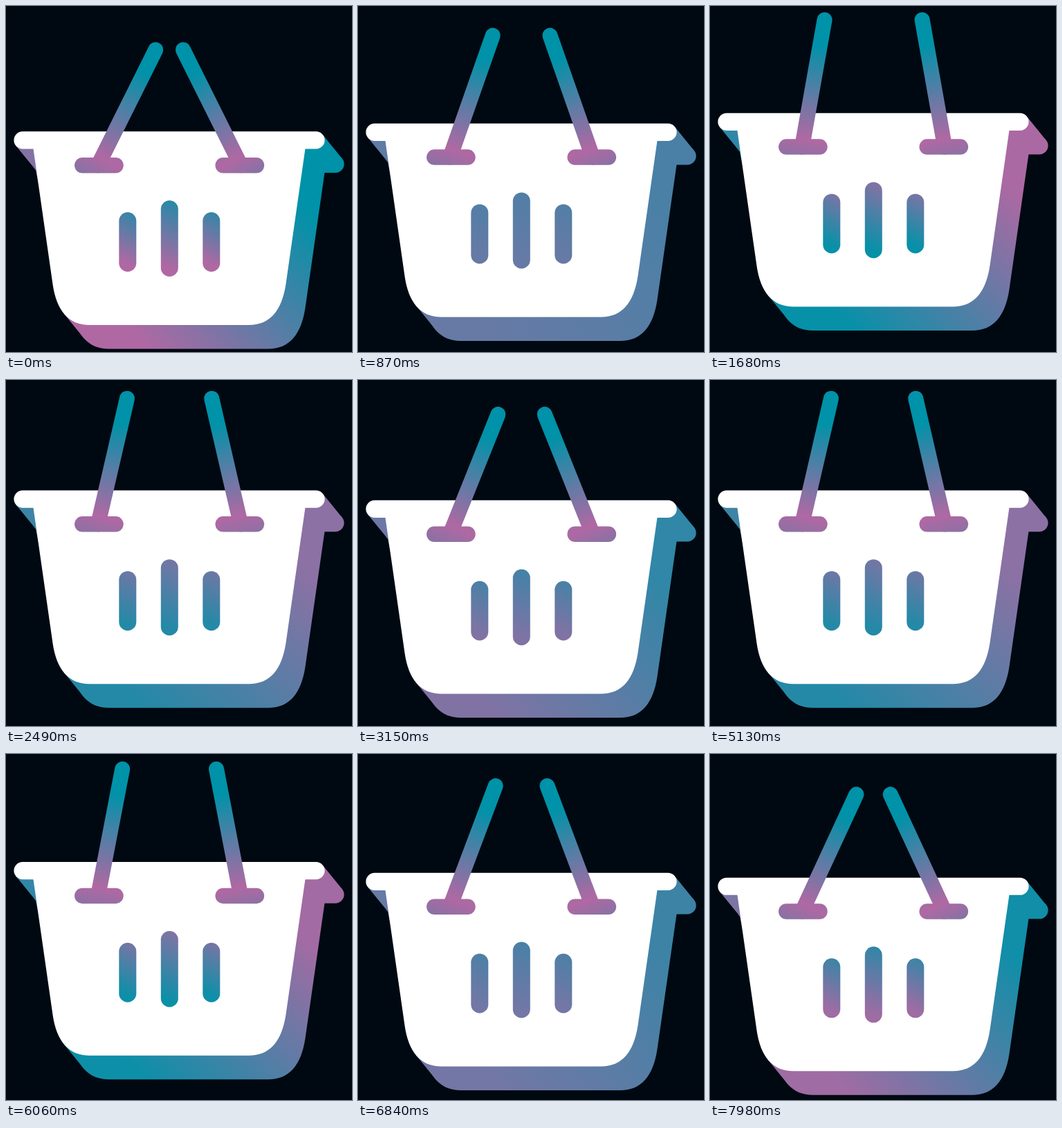
An HTML page with a canvas for the animation above (8010 ms loop, 500 by 500 pixels).

```html
<!DOCTYPE html>
<html lang="en">
<head>
<meta charset="utf-8">
<title>Shopping basket</title>
<style>
  html, body { margin: 0; height: 100%; overflow: hidden; background: #000911; }
  canvas { display: block; }
</style>
</head>
<body>
<canvas id="stage" width="500" height="500"></canvas>
<script>
const ctx = document.getElementById('stage').getContext('2d');
const LOOP = 8010, TICK = 30, CYCLE = 120;
const LIFT = 27.5, AXIS = 236.1;
const TEAL = [0, 146, 168], PINK = [176, 104, 163];

const basket = new Path2D(
  'M24 181.3H448a12.6 12.6 0 0 1 0 25.2H432.4L404.4 402' +
  'C398.500 440 382 461 350.500 461H121C90 461 73 440 67.500 402' +
  'L39.500 206.500H24a12.6 12.6 0 0 1 0 -25.2Z');

// Basket copy pushed down-right, plus the slab joining it to the front
const shade = new Path2D();
shade.addPath(basket, new DOMMatrix([1, 0, 0, 1, 28, 34.5]));
const slab = new Path2D(
  'M14.3 201.900L43 237L84.700 445.700L112.700 480.200H300L420 300L432 240H476L485.700 220.600L457.700 186.100Z');

const mix = (a, b, k) => `rgb(${a.map((v, i) => v + (b[i] - v) * k)})`;

function gradient(x1, y1, x2, y2, ...stops) {
  const g = ctx.createLinearGradient(x1, y1, x2, y2);
  stops.forEach(([at, color]) => g.addColorStop(at, color));
  return g;
}

function line(x1, y1, x2, y2, width, style) {
  ctx.strokeStyle = style;
  ctx.lineWidth = width;
  ctx.beginPath();
  ctx.moveTo(x1, y1);
  ctx.lineTo(x2, y2);
  ctx.stroke();
}

// Drawn in the frame of its pivot, leaning right
function handle(angle) {
  const sx = Math.sin(angle), sy = -Math.cos(angle);
  const fill = gradient(-42 * sx, -42 * sy, 150 * sx, 150 * sy,
    [0, mix(PINK, TEAL, 0.4)], [54 / 192, mix(PINK, TEAL, 0)], [1, mix(PINK, TEAL, 1)]);
  line(0, 0, 186.5 * sx, 186.5 * sy, 22, fill);
  line(-22.7, 0, 25.5, 0, 22.5, fill);
}

function slot(x, top, bottom, low, high) {
  const fill = gradient(x - 10, bottom - 15, x + 35, top - 15, [0, low], [1, high]);
  line(x, top + 12.5, x, bottom - 12.5, 25, fill);
}

function draw(time) {
  // Every 19th tick repeats the pose before it
  const tick = Math.floor(time % LOOP / TICK) - 1;
  const step = tick - Math.floor(tick / 19);
  const rise = (1 - Math.cos(2 * Math.PI * step / CYCLE)) / 2;
  const low = mix(PINK, TEAL, rise), high = mix(TEAL, PINK, rise);

  ctx.resetTransform();
  ctx.fillStyle = '#000911';
  ctx.fillRect(0, 0, 500, 500);
  ctx.lineCap = 'round';
  ctx.translate(0, -LIFT * rise);

  ctx.fillStyle = gradient(180, 470, 395, 255, [0, low], [1, high]);
  ctx.fill(shade);
  ctx.fill(slab);
  ctx.fillStyle = '#fff';
  ctx.fill(basket);

  slot(175.8, 298, 384, low, high);
  slot(236.3, 281, 391, low, high);
  slot(296.8, 298, 384, low, high);

  for (const side of [1, -1]) {
    ctx.save();
    ctx.translate(AXIS - side * 103.1, 230.2);
    ctx.scale(side, 1);
    handle((26.5 - 17 * rise) * Math.PI / 180);
    ctx.restore();
  }
}

const start = performance.now();
function loop() {
  draw(performance.now() - start);
  requestAnimationFrame(loop);
}
loop();
</script>
</body>
</html>
```
